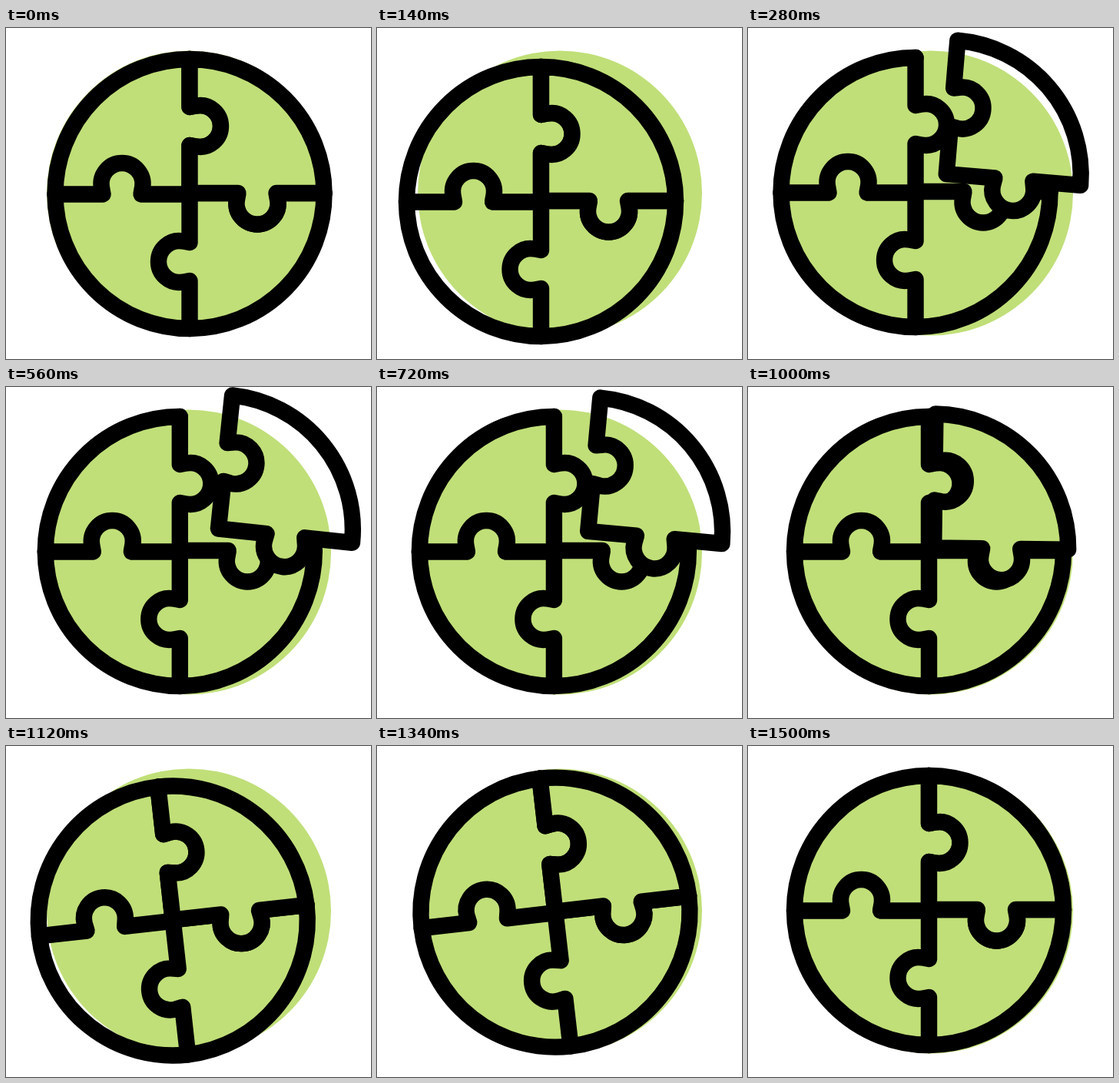
Animation of 475 by 430 pixels, one loop 1.66 s. Source, as an HTML page:

```html
<!DOCTYPE html>
<html lang="en">
<head>
<meta charset="utf-8">
<title>Puzzle wheel</title>
<style>
  html, body { margin: 0; height: 100%; overflow: hidden; background: #fff; }
  svg { display: block; }
  #wheel { fill: none; stroke: #000; stroke-width: 21.4; stroke-linecap: round; stroke-linejoin: round; }
</style>
</head>
<body>
<svg width="475" height="430" viewBox="0 0 475 430">
  <defs>
    <path id="arm" d="M0-175V-113L9.5-114.7A27 27 0 1 1 9.5-61.3L0-63V0"/>
    <!-- Hides the rest of the wheel behind the loose piece -->
    <mask id="behind" maskUnits="userSpaceOnUse" x="-240" y="-240" width="480" height="480">
      <rect x="-240" y="-240" width="480" height="480" fill="#fff"/>
      <use href="#piece"/>
    </mask>
  </defs>
  <circle cx="238" cy="214.5" r="185" fill="#c0df78"/>
  <g id="wheel">
    <g mask="url(#behind)">
      <path d="M0-175A175 175 0 1 0 175-1"/>
      <use href="#arm"/>
      <use href="#arm" transform="translate(0 -1) rotate(90)"/>
      <use href="#arm" transform="rotate(180)"/>
      <use href="#arm" transform="translate(0 .5) rotate(270)"/>
    </g>
    <path id="piece" d="M0-175A175 175 0 0 1 175-1H113L114.7 8.5A27 27 0 1 1 61.3 8.5L63-1H0V-63L9.5-61.3A27 27 0 1 0 9.5-114.7L0-113Z"/>
  </g>
</svg>
<script>
  const LOOP = 1660, STEP = 20;
  const wheel = document.getElementById('wheel');
  const piece = document.getElementById('piece');

  const smooth = u => u * u * (3 - 2 * u);
  const easeIn = p => u => u ** p;
  const easeOut = p => u => 1 - (1 - u) ** p;

  // Each key is [time, value, easing used to reach it].
  function track(keys) {
    return t => {
      const i = keys.findIndex(key => t < key[0]);
      if (i < 0) return keys[keys.length - 1][1];
      if (i === 0) return keys[0][1];
      const [t0, a] = keys[i - 1];
      const [t1, b, ease] = keys[i];
      return a + (b - a) * ease((t - t0) / (t1 - t0));
    };
  }

  const shiftX = track([
    [0, 3.5], [140, -22, smooth], [1000, 0, easeOut(1.3)], [1030, 0, smooth],
    [1112, -19, easeOut(1.66)], [1500, 0, easeOut(1.9)]
  ]);
  const shiftY = track([
    [0, 2], [140, 12, smooth], [270, 0, smooth], [1030, 0, smooth],
    [1112, 14, easeOut(1.66)], [1500, 0, easeOut(1.9)]
  ]);
  const turn = track([
    [1030, 0], [1130, -6.5, easeOut(1.7)], [1320, -6.8, smooth], [1500, 0, smooth]
  ]);
  const pop = track([
    [140, 0], [560, 1, easeOut(4)], [1030, 0, easeIn(2)]
  ]);

  function draw(now) {
    const t = Math.floor(now % LOOP / STEP) * STEP;
    const k = pop(t);
    wheel.setAttribute('transform',
      `translate(${235.5 + shiftX(t)} ${213.5 + shiftY(t)}) rotate(${turn(t)})`);
    piece.setAttribute('transform', `translate(${50 * k} ${-28.5 * k}) rotate(${6 * k})`);
  }

  const start = performance.now();
  function frame() {
    draw(performance.now() - start);
    requestAnimationFrame(frame);
  }
  frame();
</script>
</body>
</html>
```
